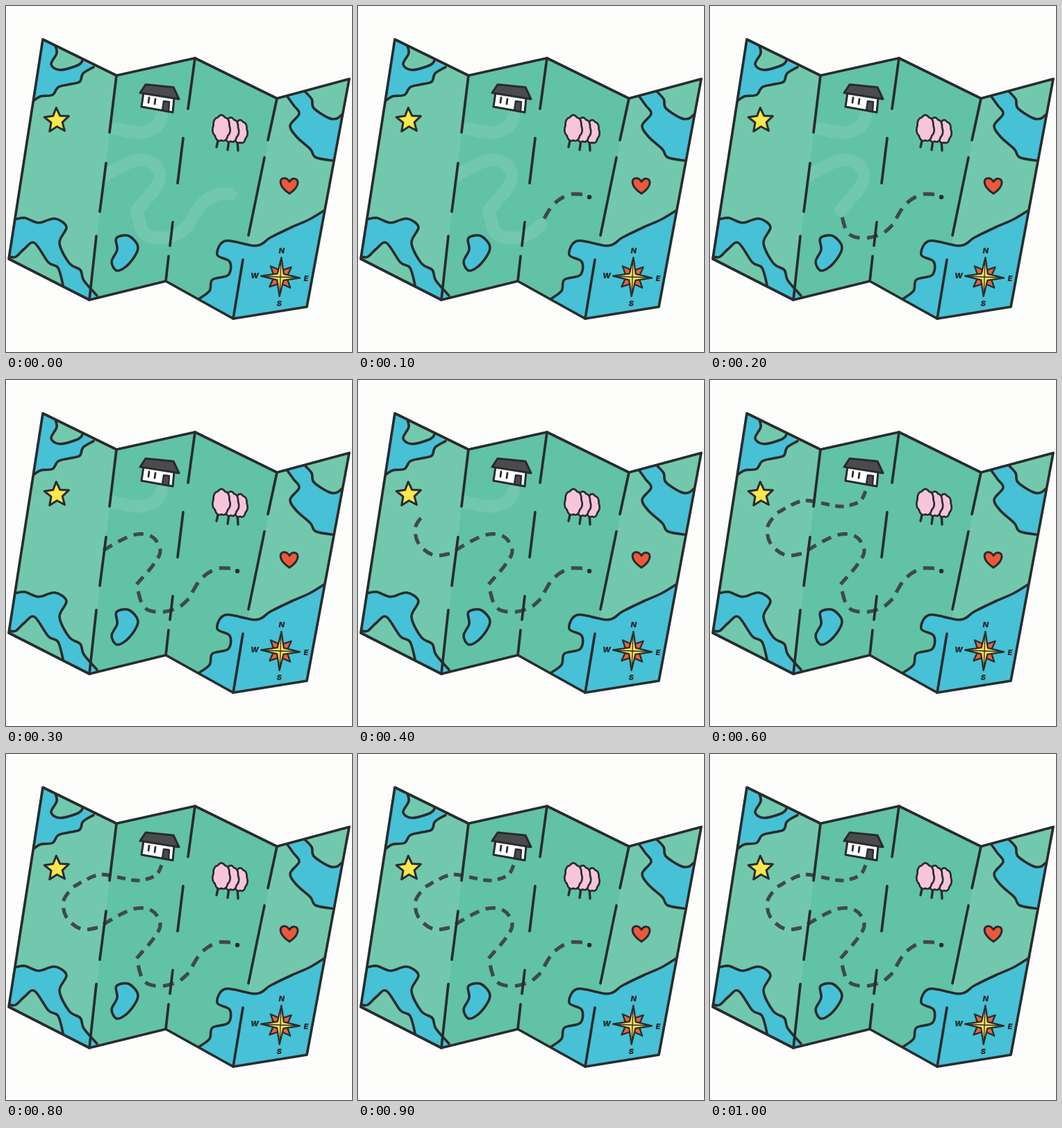
An HTML page for the animation above (1.1 s loop, 498x498 px).

```html
<!DOCTYPE html>
<html lang="en">
<head>
<meta charset="utf-8">
<title>Folded map</title>
<style>
  html, body { margin: 0; width: 100%; height: 100%; overflow: hidden; background: #fdfefc; }
  svg { display: block; width: 498px; height: 498px; stroke-linejoin: round; stroke-linecap: round; }
  text { font: italic 900 11px Inter, sans-serif; text-anchor: middle; }
</style>
</head>
<body>
<svg id="stage" viewBox="0 0 498 498">
  <clipPath id="map"><path d="M53 48L159 100L272 75L390 133L494 105L433 433L327 450L230 396L120 423L4 364Z"/></clipPath>
  <clipPath id="middle"><path d="M159 100L272 75L390 133L327 450L230 396L120 423Z"/></clipPath>
</svg>
<script>
const stage = document.getElementById('stage');
const INK = '#292b2d', SIDE = '#72c8ad', MIDDLE = '#62c2a5', WATER = '#46c1d5', PALE = '#72c8ae';
const STEP = 100, LOOP = 1100;

function add(tag, attrs, parent = stage) {
  const node = document.createElementNS('http://www.w3.org/2000/svg', tag);
  for (const name in attrs) node.setAttribute(name, attrs[name]);
  return parent.appendChild(node);
}

const draw = (d, fill, width = 3, parent = stage, stroke = INK) =>
  add('path', { d, fill, stroke: width ? stroke : 'none', 'stroke-width': width }, parent);

// Smooth path through a few key points
function curve(text, closed) {
  const pts = text.split(' ').map(pair => pair.split(',').map(Number)), n = pts.length;
  const at = i => pts[closed ? (i + n) % n : Math.max(0, Math.min(n - 1, i))];
  let d = `M${pts[0]}`;
  for (let i = 0; i < (closed ? n : n - 1); i++) {
    const [a, b, c, e] = [-1, 0, 1, 2].map(k => at(i + k));
    d += `C${b.map((v, k) => v + (c[k] - a[k]) / 6)} ${c.map((v, k) => v - (e[k] - b[k]) / 6)} ${c}`;
  }
  return d;
}

// Closed outline whose radius depends on the angle, clockwise from the top
function radial(x, y, count, radius, tilt = 0) {
  const pts = Array.from({ length: count }, (_, i) => {
    const a = tilt + i / count * 2 * Math.PI, [rx, ry = rx] = radius(i, a);
    return `${x + rx * Math.sin(a)} ${y - ry * Math.cos(a)}`;
  });
  return `M${pts.join('L')}Z`;
}

const star = (x, y, tips, outer, inner, tilt) =>
  radial(x, y, 2 * tips, i => [i % 2 ? inner : outer], tilt);

const cloud = (x, y, rx, ry) => radial(x, y, 72, (i, a) => {
  const bump = .93 + .1 * Math.abs(Math.cos(3.5 * a));
  return [rx * bump, ry * bump];
});

// Land
const outline = document.querySelector('#map path').getAttribute('d');
const land = add('g', { 'clip-path': 'url(#map)' });
draw(outline, SIDE, 0, land);
draw(document.querySelector('#middle path').getAttribute('d'), MIDDLE, 0, land);

// Shoreline, filled out to the map corners it cuts off
function coast(points, corners, fill) {
  const line = curve(points);
  draw(line + corners, fill, 0, land);
  draw(line, 'none', 3.6, land);
}
coast('126,88 111,97 106,109 90,113 75,117 67,128 50,130 39,137', 'L53 48', WATER);
coast('71,57 73,68 65,84 78,92 104,85 111,77', '', SIDE);
coast('404,129 414,143 422,155 409,172 418,188 438,206 446,218 474,223', 'L494 105', WATER);
coast('429,122 440,134 443,147 464,161 476,162 486,154', 'L494 105', SIDE);
coast('13,307 27,305 47,312 70,306 87,318 77,341 91,370 107,380 112,395 131,417', 'L120 423L4 364', WATER);
coast('5,361 14,361 27,349 41,341 61,369 75,377 83,406', '', SIDE);
coast('460,293 437,307 412,318 381,333 360,345 316,338 304,358 322,368 320,387 297,394 293,410 277,422',
  'L327 450L433 433', WATER);
draw(curve('159,334 177,331 190,348 177,371 160,381 152,368 160,351', true), WATER, 3.6, land);

// Trail legs in walking order, each with its number of dashes
const smears = add('g', { 'clip-path': 'url(#middle)' });
const legs = [
  ['323,271 302,272 280,287 263,315', 3],
  ['263,315 247,328 221,334 198,326 188,294', 4],
  ['188,294 212,266 222,245 209,225 180,224 132,250', 7],
  ['132,250 108,252 87,235 83,211 97,191', 4],
  ['97,191 132,174 160,177', 3],
  ['160,177 190,182 215,175 224,160', 3.6]
].map(([points, dashes]) => {
  const d = curve(points);
  const smear = draw(d, 'none', 18, smears, PALE);
  const trail = draw(d, 'none', 5.2, stage, '#3f494b');
  for (const [name, value] of [['pathLength', dashes], ['stroke-dasharray', '.6 .4'], ['stroke-linecap', 'butt']])
    trail.setAttribute(name, value);
  return { smear, trail };
});
const dot = add('circle', { cx: 333, cy: 275, r: 3.2, fill: INK });

// Folds and edge
draw(`M159 100L149 182M144 226L135 296M130 331L120 423
  M272 75L262 148M255 190L247 255M240 311L236 345M234 360L230 396
  M390 133L377 193M372 218L349 330M341 365L327 450`, 'none', 3.7);
draw(outline, 'none', 3.7);

// House
draw('M198 125L242 132L240 153L195 145Z', '#fff');
draw('M201 113L241 117L249 134L193 125Z', '#4b4b4d');
draw('M206 132L205 139M215 134L214 141', 'none', 2.8);
draw('M227 137L235 138L234 152L225 150Z', '#4b4b4d', 2.4);

// Trees
draw('M306 190L303 203M321 193L319 207M333 193L334 208', 'none', 3.4);
for (let i = 2; i >= 0; i--) draw(cloud(310 + 13.5 * i, 176 + 2.5 * i, 12.5 - i, 18.5 - i), '#f6c5dc', 2.7);

draw(star(73, 165, 5, 18.5, 8.5, -.04), '#fbe64d');
draw('M408 270C402 266 395 260 395 253C396 246 404 246 408 253C412 246 420 248 420 254C420 260 414 266 408 270Z', '#ee573a');

// Compass
const tilt = .05;
draw(star(395, 390, 4, 21, 9, tilt + Math.PI / 4), '#ea6240', 2.3);
draw(star(395, 390, 4, 28, 6.5, tilt), '#f8df55', 2.3);
draw('M396 364L394 416M369 389L421 391', 'none', 1.3);
[...'NESW'].forEach((letter, i) => {
  const a = i * Math.PI / 2 + tilt;
  add('text', { x: 395 + 37 * Math.sin(a), y: 394 - 38.5 * Math.cos(a), fill: INK }).textContent = letter;
});

const start = performance.now();
function tick() {
  const step = Math.floor((performance.now() - start) % LOOP / STEP);
  const show = (node, on) => node.setAttribute('visibility', on ? 'visible' : 'hidden');
  legs.forEach(({ smear, trail }, i) => {
    show(trail, i < step);
    show(smear, i >= step);
  });
  show(dot, step > 0);
  requestAnimationFrame(tick);
}
tick();
</script>
</body>
</html>
```
